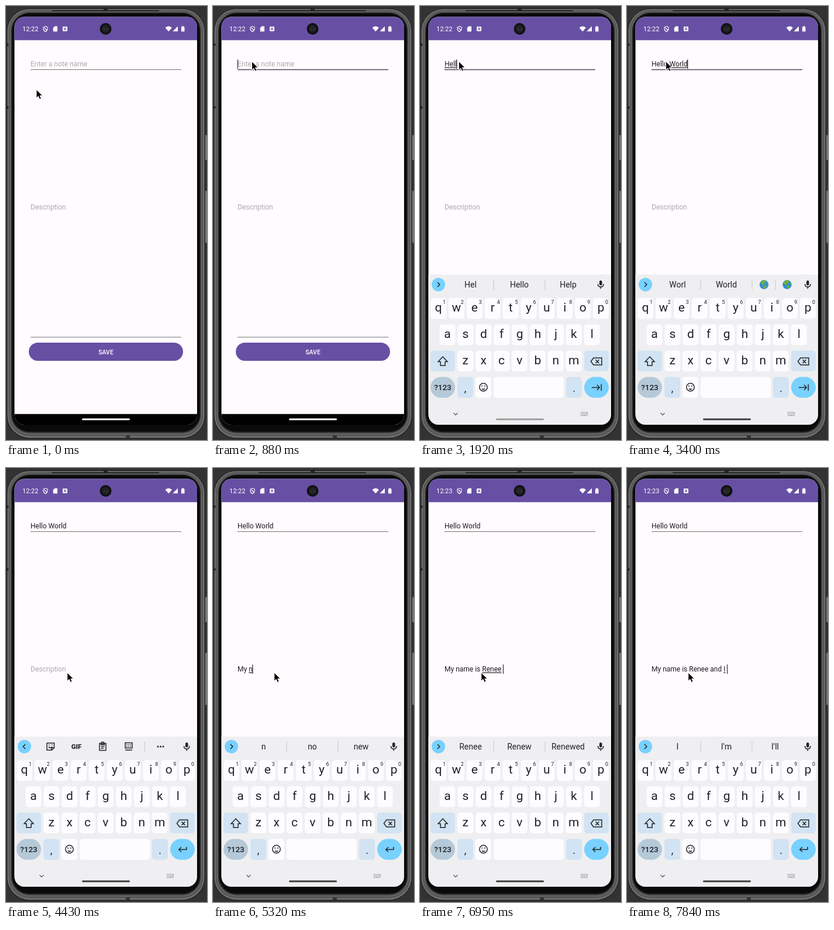
An HTML page that plays this animation: 344x740 px, repeating every 7990 ms.

```html
<!DOCTYPE html>
<html lang="en">
<head>
<meta charset="utf-8">
<title>Note form</title>
<style>
html, body { margin: 0; width: 100%; height: 100%; overflow: hidden; background: #333; }
svg { display: block; font-family: Roboto, "Noto Sans", sans-serif; }
text { white-space: pre; }
.mid { text-anchor: middle; }
.icon { fill: none; stroke: #242629; stroke-width: 1.5; }
.u { text-decoration: underline; text-decoration-thickness: 1px; }
</style>
</head>
<body>
<svg width="344" height="740" viewBox="0 0 344 740">
  <defs>
    <clipPath id="screen"><rect x="14.5" y="18.5" width="312.5" height="695.5" rx="17"/></clipPath>
    <g id="globe">
      <circle r="7.7" fill="#2b8de0"/>
      <path fill="#6fae3a" d="M-6-4Q-2-9 3-7L4-4 0-2 1 0-2 1-5-1ZM0 1 5 2 3 6 1 7.4-1 4ZM6-4 7.4 0 5-1Z"/>
    </g>
  </defs>

  <g id="phone"></g>

  <g clip-path="url(#screen)">
    <rect width="344" height="740" fill="#fffbfe"/>
    <rect width="344" height="58.3" fill="#6750a4"/>
    <rect y="695.7" width="344" height="44.3"/>

    <g fill="#fff">
      <text id="clock" x="28" y="43" font-size="11"></text>
      <path d="M67.5 34.5 71 36V39Q71 42 67.5 43.8 64 42 64 39V36ZM65.5 37 70 41.5" fill="none" stroke="#fff" stroke-width="1.1"/>
      <path d="M83.5 34.5H88V43.5H80.8V37.2Z"/>
      <rect x="97" y="35" width="8" height="8" rx="1"/>
      <path d="M99 41.5 101 36.5 103 41.5M99.8 40H102.2" fill="none" stroke="#6750a4"/>
      <path d="M272.6 37Q278.3 32 284 37L278.3 43.5ZM285.5 43.3 294 34.5V43.3Z"/>
      <path d="M300 35.5H301.5V34.3H304V35.5H305.5V43.5H300Z"/>
    </g>

    <path id="line" d="M42 108.5H300"/>
    <path d="M42 564.7H300" stroke="#77757a"/>
    <text id="title" x="42" y="103.4" font-size="12"></text>
    <text id="note" x="42" y="347.4" font-size="12"></text>
    <rect id="caret" width="1.2" height="16" fill="#302c40"/>

    <rect x="39" y="574" width="264" height="31" rx="15.5" fill="#6750a4"/>
    <text class="mid" x="171" y="593.6" font-size="10.5" font-weight="500" fill="#fff">SAVE</text>

    <g id="board">
      <rect y="458" width="344" height="290" fill="#efeff1"/>
      <g id="keys"></g>
      <g class="icon">
        <path d="M39 598 47 606.5H43V613H35V606.5H31Z"/>
        <path d="M297 600H311V612H297L292.5 606ZM300.5 603 306.5 609M306.5 603 300.5 609"/>
        <circle cx="108.5" cy="650" r="6.7"/>
        <path d="M105 652.5Q108.5 657 112 652.5Z" fill="#242629" stroke="none"/>
        <path d="M106 647V649M111 647V649"/>
        <path id="tab" d="M294 650.5H307M303 646 307.3 650.5 303 655M310.3 645V656"/>
        <path id="enter" d="M309 646V650.5H296M300 646.5 295.8 650.5 300 654.5"/>
        <path d="M57.5 694 61 697.5 64.5 694" stroke="#555" stroke-width="1.2"/>
        <rect x="275.5" y="692.5" width="11" height="6" stroke="#999" stroke-width=".7"/>
        <path d="M277 694.5H286M277 696H286M278.5 697.5H284" stroke="#888" stroke-width="1" stroke-dasharray="1 1"/>
      </g>
      <circle cx="31.5" cy="475" r="11.5" fill="#78d1ff"/>
      <path id="chevron" class="icon"/>
      <rect x="307" y="468" width="4.6" height="8.5" rx="2.3" fill="#242629"/>
      <path class="icon" d="M304.5 474Q304.5 479 309.3 479 314 479 314 474M309.3 479V482.3"/>
      <g id="tools">
        <g class="icon">
          <path d="M70 469H82.5V477L78.5 481H70ZM78 481V477H82M73 475Q76 479.5 79 475M73 472H74.5M78 472H79.5"/>
          <path d="M160 469.5H171V481.5H160ZM162.5 470V472H168.5V470M162.5 475H168.5M162.5 478H167"/>
          <rect x="163.5" y="467.5" width="4" height="2.5"/>
          <rect x="204" y="468.5" width="12" height="9"/>
          <path d="M206 471.5H214.5M206 474.5H214.5" stroke-dasharray="1.6 1.6"/>
          <path d="M204 481H216"/>
        </g>
        <text class="mid" x="120.5" y="479" font-size="11.5" font-weight="800" fill="#242629">GIF</text>
        <path d="M237.5 466V484" stroke="#c6c7ca"/>
        <g fill="#242629"><circle cx="260" cy="475" r="1.5"/><circle cx="264.5" cy="475" r="1.5"/><circle cx="269" cy="475" r="1.5"/></g>
      </g>
      <g id="words"></g>
    </g>
    <rect id="pill" x="130" y="703.3" width="82" height="3" rx="1.5"/>
  </g>

  <circle cx="170.5" cy="39" r="10" fill="#101112"/>
  <circle cx="170.5" cy="39" r="6.5" fill="#202224"/>
  <path d="M167 39.5H169M172 39.5H174" stroke="#55585c"/>

  <path id="mouse" d="M0 0V14.5L3.3 11.5 5.6 16.6 8.3 15.4 6 10.5H10.5Z" stroke="#fff"/>
</svg>

<script>
const LOOP = 7990, TICK = 147.6;
const $ = id => document.getElementById(id);
const show = (id, on) => $(id).setAttribute('display', on ? 'inline' : 'none');
const box = (x, y, w, h, r, fill) =>
  `<rect x="${x}" y="${y}" width="${w}" height="${h}" rx="${r}" fill="${fill}"/>`;
const label = (x, y, s, size, weight = 400) =>
  `<text class="mid" x="${x}" y="${y}" font-size="${size}" font-weight="${weight}" fill="#202225">${s}</text>`;

// phone body: nested rings from the outside in
const rings = ['#242424', '#4a4a4a', '#808080', '#5a5a5a', '#545454', '#5c5c5c', '#646464', '#505050', '#2e2e2e', '#161616', '#0a0a0a'];
$('phone').innerHTML =
  box(341, 220, 3, 43, 1, '#777') + box(341, 315, 3, 89, 1, '#777') +
  rings.map((c, d) => box(d + 1, 4 + d * .9, 340 - 2 * d, 734 - d * 2.2, 39 - d, c)).join('') +
  box(78, 7, 184, 2, 1, '#222') +
  box(0, 64, 4, 4, 0, '#222') + box(0, 171, 4, 4, 0, '#222') +
  box(167, 3, 7, 4, 0, '#222') + box(205, 732, 7, 5, 0, '#333');

const white = '#fdfcff', pale = '#d2e3f3';
const rows = [['qwertyuiop', 31.5, 498], ['asdfghjkl', 47, 542.7], ['zxcvbnm', 77.7, 587.5]];
let keys = '';
rows.forEach(([letters, left, y], row) => [...letters].forEach((c, i) => {
  const x = left + 30.9 * i;
  keys += box(x - 13.5, y, 27, 35.5, 5, white) + label(x, y + 23.3, c, 21);
  if (!row) keys += label(x + 10, y + 9.8, (i + 1) % 10, 9);
}));
$('keys').innerHTML = keys +
  box(18, 587.5, 42, 35.5, 5, pale) + box(281, 587.5, 42, 35.5, 5, pale) +
  box(18, 632.5, 42, 35.5, 17.7, '#b5c9d8') + box(64, 632.5, 27, 35.5, 5, pale) +
  box(95, 632.5, 27, 35.5, 5, white) + box(126, 632.5, 120, 35.5, 5, white) +
  box(250, 632.5, 27, 35.5, 5, pale) + box(281, 632.5, 42, 35.5, 17.7, '#78d1ff') +
  label(39, 655, '?123', 13.5, 500) + label(77.5, 657.5, ',', 18) + label(263.5, 657.5, '.', 18);

// [tick, text, suggestions]; _x_ is the underlined word, @ the globes
const titleSteps = [
  [0, '', ''], [9, 'H', ''], [10, '_H_', 'H|Hello|However'], [11, '_He_', 'H|Hello|However'],
  [13, '_Hell_', 'Hel|Hello|Help'], [15, '_Hello_', 'Hell|Hello|Help'],
  [16, '_Hello_ ', 'Hello|Hello,|Hells'], [18, 'Hello W', 'and|I|the'],
  [19, 'Hello _W_', 'W|Would|What'], [20, 'Hello _Wo_', 'W|Would|What'],
  [21, 'Hello _Wor_', 'Wo|Would|Work'], [22, 'Hello _Worl_', 'Wor|Work|World'],
  [23, 'Hello _World_', 'Worl|World|@'], [26, 'Hello World', '']
];
const noteSteps = [
  [0, '', ''], [32, '_M_', 'M|My|May'], [33, '_My_', 'M|My|May'], [35, '_My_ ', 'My|Myself|Mystery'],
  [36, 'My _n_', 'n|no|new'], [37, 'My _na_', 'n|no|new'], [38, 'My _nam_', 'na|name|nah'],
  [39, 'My _name_', 'nam|name|named'], [40, 'My _name_ ', 'name|names|named'],
  [41, 'My name _is_ ', "is|isn't|issue"], [42, 'My name is _R_', 'R|Right|Really'],
  [43, 'My name is _Re_', 'R|Right|Really'], [44, 'My name is _Ren_', 'Re|Rent|Rental'],
  [46, 'My name is _Renee_', 'Rene|Renew|Renewed'], [47, 'My name is _Renee_ ', 'Renee|Renew|Renewed'],
  [48, 'My name is Renee _a_', 'a|and|as'], [49, 'My name is Renee _an_', 'a|and|as'],
  [50, 'My name is Renee _and_', 'an|and|any'], [51, 'My name is Renee _and_ ', 'and|any|ands'],
  [52, 'My name is Renee and _I_', "I|I'm|I'll"], [53, 'My name is Renee and _I_ ', "I|I'm|I'll"]
];
const at = (steps, n) => steps.findLast(s => s[0] <= n);

// pointer stops: [tick, x, y]
const path = [[0, 52, 142.4], [1, 52, 142.4], [3, 70, 82], [5, 66.5, 94.5], [24, 66.5, 94.5], [26, 104.8, 348.8], [99, 104.8, 348.8]];
function pointer(n) {
  const i = path.findIndex(p => p[0] > n), [a, ax, ay] = path[i - 1], [b, bx, by] = path[i];
  const u = (n - a) / (b - a), k = u * u * (3 - 2 * u);
  return [ax + (bx - ax) * k, ay + (by - ay) * k];
}

function fill(id, text, hint) {
  $(id).innerHTML = text ? text.replace(/_(\w+)_/, '<tspan class="u">$1</tspan>') : hint;
  $(id).setAttribute('fill', text ? '#1d1b20' : '#aba8ac');
  return text ? $(id).getComputedTextLength() : 0;
}

function suggest(list) {
  show('tools', !list);
  $('chevron').setAttribute('d', list ? 'M29.8 471 33.8 475 29.8 479' : 'M33.2 471 29.2 475 33.2 479');
  const bars = list.includes('@') ? [126, 214, 254] : [126, 214];
  $('words').innerHTML = !list ? '' :
    bars.map(x => `<path d="M${x} 466V484" stroke="#c6c7ca"/>`).join('') +
    list.split('|').map((w, i) => w === '@'
      ? '<use href="#globe" x="234.5" y="475"/><use href="#globe" x="274" y="475"/>'
      : label(86.5 + 83.5 * i, 480, w, 14)).join('');
}

function draw(n) {
  const inNote = n >= 26, focused = n >= 6;
  const [, title, titleWords] = at(titleSteps, n), [, note, noteWords] = at(noteSteps, n);
  const titleEnd = fill('title', title, 'Enter a note name');
  const noteEnd = fill('note', note, 'Description');
  suggest(inNote ? noteWords : titleWords);

  show('caret', focused && n !== 30 && n !== 31);
  $('caret').setAttribute('x', 41.5 + (inNote ? noteEnd : titleEnd));
  $('caret').setAttribute('y', inNote ? 335 : 91);
  const active = focused && !inNote;
  $('line').setAttribute('stroke', active ? '#4b4661' : '#77757a');
  $('line').setAttribute('stroke-width', active ? 1.3 : 1);

  show('tab', !inNote);
  show('enter', inNote);
  show('board', n >= 7);
  $('board').setAttribute('transform', `translate(0 ${n === 7 ? 110 : 0})`);
  const dark = Math.min(1, Math.max(0, (n - 8) / 10)), g = 255 - 190 * dark;
  $('pill').setAttribute('fill', `rgb(${g},${g},${g})`);
  $('clock').textContent = n < 38 ? '12:22' : '12:23';
  $('mouse').setAttribute('transform', `translate(${pointer(n)})`);
}

let last = -1;
const start = performance.now();
function loop() {
  const t = (performance.now() - start) % LOOP;
  const n = Math.min(53, Math.floor((t + 10) / TICK));
  if (n !== last) draw(last = n);
  requestAnimationFrame(loop);
}
loop();
</script>
</body>
</html>
```
